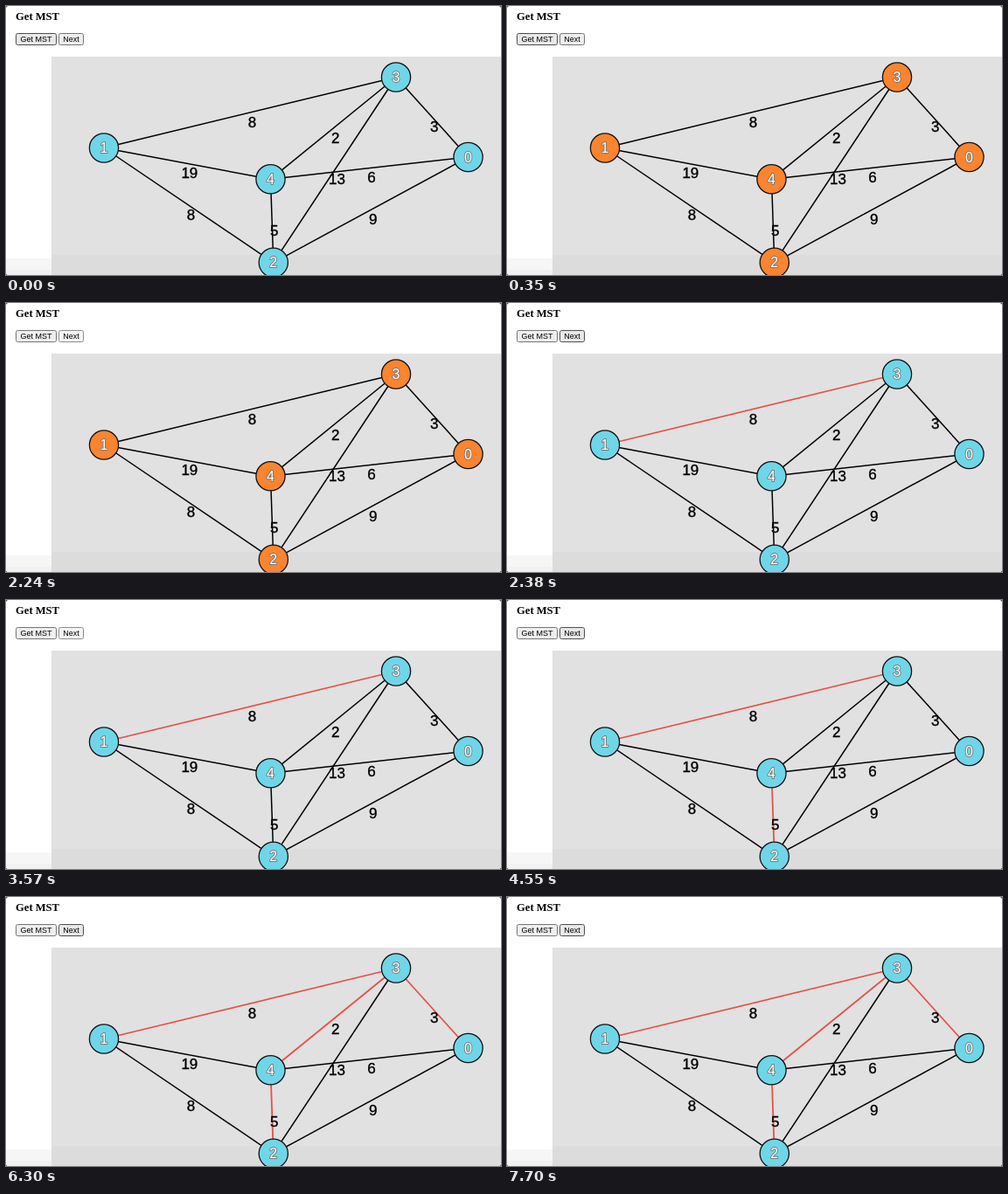
Recreate the animation shown at these times as an HTML page. Size 566 by 308 pixels, loop 8 s.

```html
<!DOCTYPE html>
<html lang="en">
<head>
<meta charset="utf-8">
<title>Get MST</title>
<style>
html, body { margin: 0; width: 100%; height: 100%; overflow: hidden; background: #333; }
svg { display: block; width: 566px; height: 308px; border-radius: 3px; background: #fff; }
text { font-family: "Liberation Sans", Arial, sans-serif; }
.title { font: bold 12.6px "Liberation Serif", Times, serif; }
.button rect { fill: #efefef; stroke: #767676; }
.button text { font-size: 9px; text-anchor: middle; }
.edge { stroke: #000; stroke-width: 1.5; }
.weight { font-size: 17px; text-anchor: middle; stroke: #000; stroke-width: 0.35; }
.node circle { fill: #6fd6e8; stroke: #111; stroke-width: 1.3; }
.node text {
  font-size: 16px; text-anchor: middle; fill: #fff;
  stroke: #777; stroke-width: 1.8; paint-order: stroke; stroke-linejoin: round;
}
</style>
</head>
<body>
<svg viewBox="0 0 566 308">
  <text class="title" x="11" y="16">Get MST</text>
  <g class="button">
    <rect id="get" x="11.5" y="31.5" width="46" height="13" rx="2"/>
    <text x="34.5" y="41.3">Get MST</text>
  </g>
  <g class="button">
    <rect id="next" x="60.5" y="31.5" width="28" height="13" rx="2"/>
    <text x="74.5" y="41.3">Next</text>
  </g>
  <rect y="289" width="52" height="19" fill="#f6f6f6"/>
  <rect y="302" width="52" height="6" fill="#f1f1f1"/>
  <rect x="52" y="58" width="514" height="250" fill="#e1e1e1"/>
  <rect x="52" y="285" width="514" height="23" fill="#dcdcdc"/>
  <g id="graph"></g>
</svg>
<script>
const LOOP = 8000, PRESS = 180;
const graph = document.getElementById("graph");
const sheet = document.head.appendChild(document.createElement("style")).sheet;

const nodes = [[528.5, 173], [112, 162.5], [305.8, 293.8], [446, 81.5], [302.5, 198.3]];
// Each edge as "from-to": weight
const edges = {
  "1-3": 8, "1-4": 19, "1-2": 8, "3-4": 2, "3-2": 13,
  "4-0": 6, "2-0": 9, "4-2": 5, "3-0": 3
};
const getClick = 280;
// The last click finds no edge left to add.
const nextClicks = [2310, 3640, 4760, 6090, 7420];
const picks = ["1-3", "4-2", "3-0", "3-4"];

const idle = "fill: #efefef; stroke: #767676";
const hover = "fill: #e8e8e8; stroke: #4f4f4f";
const active = "fill: #f5f5f5; stroke: #8d8d8d";
const picked = "stroke: #e2534a; stroke-width: 1.8";

function add(tag, attrs, parent = graph, label = "") {
  const el = document.createElementNS("http://www.w3.org/2000/svg", tag);
  for (const key in attrs) el.setAttribute(key, attrs[key]);
  el.textContent = label;
  return parent.appendChild(el);
}

// Writes CSS keyframes that hold each [time, style] until the next.
function hold(selector, name, steps) {
  const frames = steps.map(([time, style]) => `${time / LOOP * 100}% { ${style} }`);
  frames.push(`100% { ${steps.at(-1)[1]} }`);
  sheet.insertRule(`@keyframes ${name} { ${frames.join(" ")} }`);
  sheet.insertRule(`${selector} { animation: ${name} ${LOOP}ms step-end infinite }`);
}

const click = time => [[time - PRESS, active], [time, hover]];

for (const pair in edges) {
  const [[x1, y1], [x2, y2]] = pair.split("-").map(id => nodes[id]);
  add("line", { class: "edge", id: `e${pair}`, x1, y1, x2, y2 });
}
for (const pair in edges) {
  const [[x1, y1], [x2, y2]] = pair.split("-").map(id => nodes[id]);
  add("text", { class: "weight", x: (x1 + x2) / 2 + 2.6, y: (y1 + y2) / 2 + 16.6 }, graph, edges[pair]);
}
nodes.forEach(([x, y], id) => {
  const node = add("g", { class: "node" });
  add("circle", { cx: x, cy: y, r: 16.6 }, node);
  add("text", { x, y: y + 5.6 }, node, id);
});

hold("#get", "get", [[0, hover], ...click(getClick), [910, idle]]);
hold("#next", "next", [[0, idle], [1050, hover], ...nextClicks.flatMap(click)]);
hold(".node circle", "reset", [
  [0, "fill: #6fd6e8"], [getClick, "fill: #fb842e"], [nextClicks[0], "fill: #6fd6e8"]
]);
picks.forEach((pair, i) => {
  hold(`#e${pair}`, `pick${i}`, [[0, "stroke: #000"], [nextClicks[i], picked]]);
});
</script>
</body>
</html>
```
